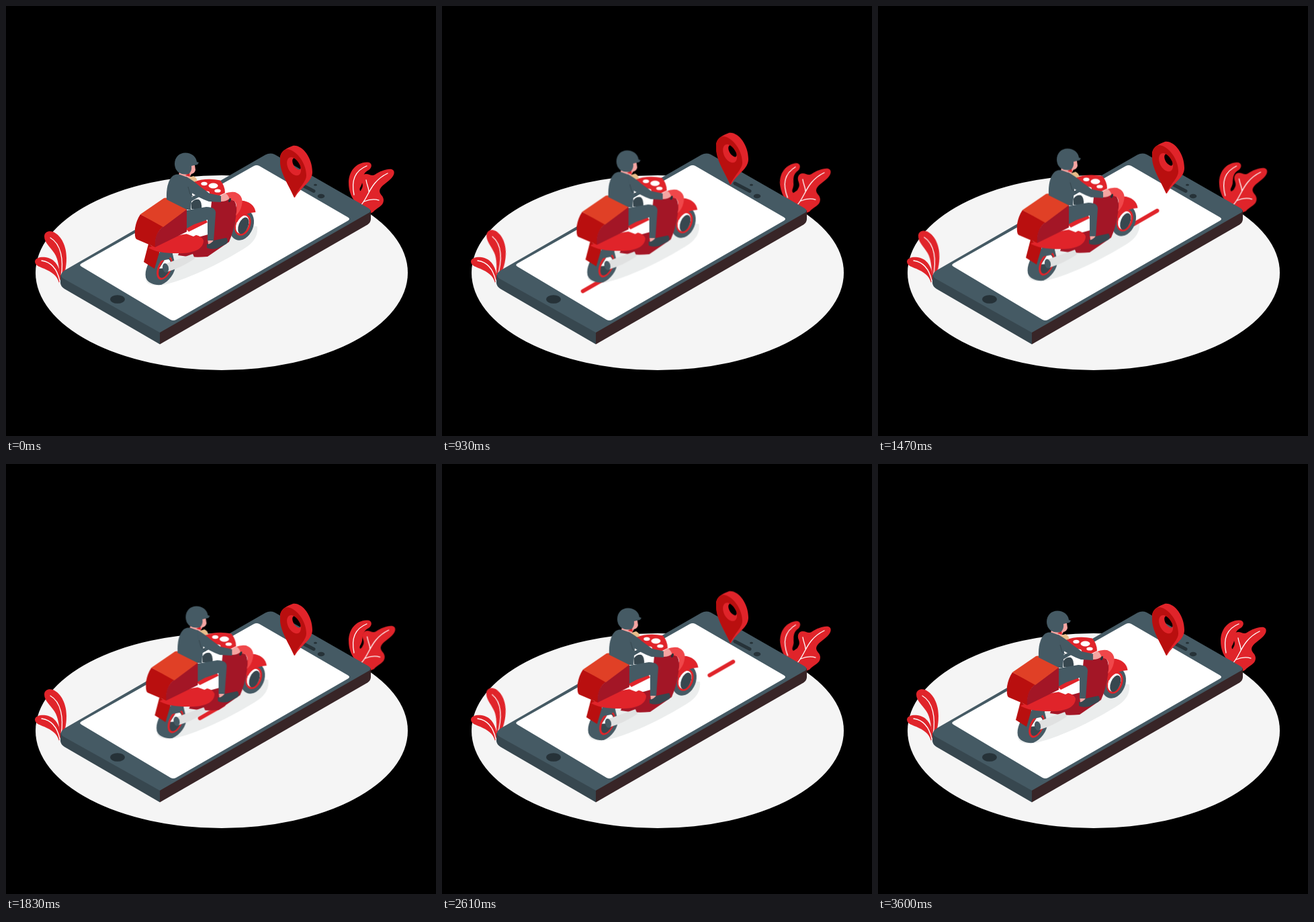
These frames come from a looping animation (640x640 px, 3630 ms). An HTML page:

```html
<!DOCTYPE html>
<html lang="en">
<head>
<meta charset="utf-8">
<title>Scooter delivery</title>
<style>
  html, body { margin: 0; width: 100%; height: 100%; overflow: hidden; background: #000; }
  svg { display: block; width: 100%; height: 100%; }

  /* Half a loop out, half a loop back */
  .slow, .fast { animation: 1815ms cubic-bezier(.37, 0, .63, 1) infinite alternate; }
  .fast { animation-duration: 907.5ms; }
  .ride { animation-name: ride; }
  .pin { animation-name: hop; }
  .leaf-l { animation-name: lean-right; transform-origin: 82px 405px; }
  .leaf-r { animation-name: lean-left; transform-origin: 541px 305px; }
  .bush { animation-name: drift; }
  .dash { animation: pass 1210ms linear infinite; }

  @keyframes ride { to { transform: translate(16.4px, -6.9px); } }
  @keyframes hop { to { transform: translateY(-19.2px); } }
  @keyframes lean-right { to { transform: rotate(8.5deg); } }
  @keyframes lean-left { to { transform: rotate(-9.5deg); } }
  @keyframes drift { to { transform: translate(1.6px, -1.8px); } }
  @keyframes pass { to { transform: translate(-308.5px, 179.9px); } }

  .red { fill: #e0242a; }
  .deep { fill: #b90f0f; }
  .wine { fill: #a31626; }
  .slate { fill: #455a64; }
  .steel { fill: #37474f; }
  .ink { fill: #263238; }
  .white { fill: #fff; }
  .skin { fill: #f5a5a2; }
  .vein { fill: none; stroke: #fff; stroke-width: 1.3; stroke-linecap: round; }
</style>
</head>
<body>
<svg viewBox="0 0 640 640">
  <defs>
    <clipPath id="lane"><path d="M196.500 180H438V460H196.500Z"/></clipPath>
  </defs>

  <ellipse cx="321" cy="397" rx="277" ry="145" fill="#f5f5f5"/>

  <!-- plants -->
  <g class="leaf-l fast">
    <path class="red" d="M81 407C79 390 78 377 72 368C66 359 57 352 57 343C57 336 64 334 70 336C83 342 90 358 90 375C90 390 87 400 83 407Z"/>
    <path class="vein" d="M66 345C82 354 86 378 82 403"/>
  </g>
  <path class="red" d="M79 412C76 401 68 396 57 391C49 388 43 386 43 380C44 374 53 373 59 374C73 376 80 388 82 404Z"/>
  <path class="vein" d="M53 379C68 381 76 391 80 409"/>

  <g class="leaf-r fast">
    <path class="red" d="M541 305C524 300 510 286 510 263C510 247 520 233 537 232.500C545 232 546 240 540 244C531 248 531 256 530 263C529 269 525 271 527 275L545 288Z"/>
    <path class="vein" d="M518 281C514 262 517 246 537 238"/>
  </g>
  <g class="bush slow">
    <path class="red" d="M541 309C531 302 522 294 521 280L528 275C530 271 532 269 530 263C527 256 530 250 536 250C541 250 544 254 549 251C557 246 566 242 574 243C580 245 578 252 573 257C566 264 557 268 556 275C556 281 562 282 562 289C562 298 552 300 546 307Z"/>
    <path class="vein" d="M527 298C540 285 541 262 568 249M536 259C537 266 540 271 540 276M533 291C540 288 548 287 555 289"/>
  </g>

  <!-- phone -->
  <path class="steel" d="M81 400V412Q81 417 87 421L229 503.500V485Z"/>
  <path fill="#382527" d="M229 485L543 304V317Q543 322 538 325.500L229 503.500Z"/>
  <path class="slate" d="M86 406Q77 400 88 393L386 221.500Q393 218 400 221L538 300Q547 305 538 309L229 486Z"/>
  <path class="white" d="M112.500 383L369 238Q373 236 377 238L509 314.500Q513 317 509 319.500L253 467Q249 469 245 467L112.500 388Q108 385.500 112.500 383Z"/>
  <g class="ink">
    <ellipse cx="166" cy="436.500" rx="11" ry="6.300"/>
    <ellipse cx="469" cy="283" rx="5.300" ry="3.200"/>
    <ellipse cx="460.500" cy="266.300" rx="2.500" ry="1.500"/>
    <path d="M436 264L458 275.500" stroke="#263238" stroke-width="5" stroke-linecap="round"/>
  </g>

  <g class="ride slow">
    <path fill="#ebeded" d="M208 408Q212 419 235 415C275 406 330 377 359 358Q376 346 374 328L350 326L250 366Z"/>
  </g>

  <g clip-path="url(#lane)">
    <path class="dash" d="M447 286L482 265.800" stroke="#e0242a" stroke-width="6" stroke-linecap="round"/>
  </g>

  <!-- scooter and rider -->
  <g class="ride slow">
    <!-- front wheel -->
    <g transform="rotate(22 351 326)">
      <ellipse class="slate" cx="351" cy="326" rx="17" ry="23.500"/>
      <ellipse class="red" cx="352" cy="325" rx="11.500" ry="17"/>
      <ellipse class="white" cx="351.500" cy="325" rx="9" ry="14"/>
      <ellipse class="steel" cx="353.500" cy="326" rx="7" ry="13"/>
    </g>
    <path class="red" d="M346 290C360 288 371 297 371.500 307C359 308 349 312 344 322L336 320Z"/>

    <!-- rear wheel -->
    <path class="slate" d="M224 368C211 380 206 394 208 404C210 412 221 416 231 415C243 410 252 397 252 386L247 365Z"/>
    <g transform="rotate(24 236 390)">
      <ellipse class="red" cx="236" cy="390" rx="10" ry="18.500"/>
      <ellipse class="steel" cx="236.500" cy="390" rx="7.500" ry="15.500"/>
      <path class="white" d="M231 379Q236 372 241 379L238 389L229 394Z"/>
    </g>
    <path class="deep" d="M212 354L229 364L221 391L205 381Z"/>
    <path class="slate" d="M228 364L249 367L242 377L231 379Z"/>

    <!-- spotted screen -->
    <path class="red" d="M278 262Q298 255 319 259.500Q326 268 326 278L308 287L285 278Z"/>
    <g class="white">
      <ellipse cx="295" cy="264.500" rx="4.600" ry="2.800"/>
      <ellipse cx="308.500" cy="267.500" rx="7" ry="4"/>
      <ellipse cx="315" cy="275" rx="4.700" ry="2.600"/>
      <ellipse cx="299" cy="278" rx="4" ry="2.600"/>
    </g>

    <!-- body -->
    <path class="wine" d="M306 291Q322 281 340 290Q345 298 342 315Q339 335 332 351L300 373Q277 375 256 371L264 350L290 343L301 340Z"/>
    <path fill="#f0474a" d="M316 287Q326 275 341 277Q354 282 351 296Q349 306 342 312Q346 297 340 290Q329 287 316 287Z"/>
    <path fill="#e0e1e1" d="M239 383L278 369L281 376Q262 389 239 396Z"/>
    <ellipse class="slate" cx="237.500" cy="390" rx="4.500" ry="7" transform="rotate(-12 237 390)"/>
    <path class="red" d="M212 360C228 352 250 341 270 339Q291 340 294 349C294 361 281 367 263 368C240 368 228 368 212 360Z"/>
    <path class="white" d="M263 337L272 335L300 321V331Q289 338 279 343Z"/>
    <path class="red" d="M266 330L297 317L300 322L272 336Z"/>

    <!-- delivery box -->
    <path class="deep" d="M200 310L235 328Q222 336 222 359L194 347Q191 345 192 331Q194 319 200 310Z"/>
    <path class="wine" d="M234 328L269 302V336L222 359Q220 339 234 328Z"/>
    <path fill="#e04026" d="M200 310L235 286Q238 285 241 286.500L270 302L234 329Z"/>

    <!-- legs -->
    <path class="steel" d="M276 302V293Q280 287 287 288Q292 291 291 303Z"/>
    <path class="slate" d="M269 304L298 299Q313 299 312 309L309 350L300 350V318L280 325L269 331Z"/>
    <path class="skin" d="M300.500 349H308.500L308 355H301Z"/>
    <path class="steel" d="M299 354Q303 356 309 349L328 345Q332 350 328 354L314 361Q304 363 299 360Z"/>

    <!-- torso and head -->
    <path fill="#e9bd8a" d="M270 256L279 253Q285 256 284 261L276 262Z"/>
    <path class="skin" d="M258 246L276 236L281 237L282 244Q281 249 276 250L272 257L257 253Z"/>
    <path class="red" d="M267 252L273 248L274 254Z"/>
    <path class="slate" d="M247 254Q252 249 259 251L270 255Q278 262 277 280L275 303L269 303L239 288Q238 264 247 254Z"/>
    <path class="slate" d="M268 254Q278 259 288 268L303 279L322 283L320 292L302 291Q285 285 271 274Z"/>
    <path d="M271 269L274 280L281 285" fill="none" stroke="#37474f" stroke-width="1"/>
    <path class="skin" d="M320 282L326 278.500Q332 282 332 287Q328 291 320 291Z"/>
    <ellipse class="ink" cx="333" cy="289" rx="1.700" ry="3.200" transform="rotate(20 333 289)"/>
    <path class="slate" d="M251 235C251 225 258 218.500 267 218.500C276 218.500 283 224 284 232L287 233L285 236L276 238Q277 246 272 250Q263 252 256 247Q251 242 251 235Z"/>
  </g>

  <!-- map pin -->
  <g class="pin fast" fill-rule="evenodd">
    <path class="red" d="M429 285C421 266 407 248 408 224C410 215 419 211 427 208C441 206 456 226 456 247C456 262 440 268 430 285ZM428 226.500C424 229 427 240 435 243.500C441 245 439 234 434 229Q430 225.500 428 226.500Z"/>
    <path class="deep" d="M429 285C421 266 407 248 408 229C408 217 414 212 421 213.500C435 217 447 236 447 252C447 262 436 270 429 285ZM422 225.500C415 229 418 245 428 251C438 256 441 246 438 238C434 229 427 223 422 225.500Z"/>
  </g>
</svg>
</body>
</html>
```
